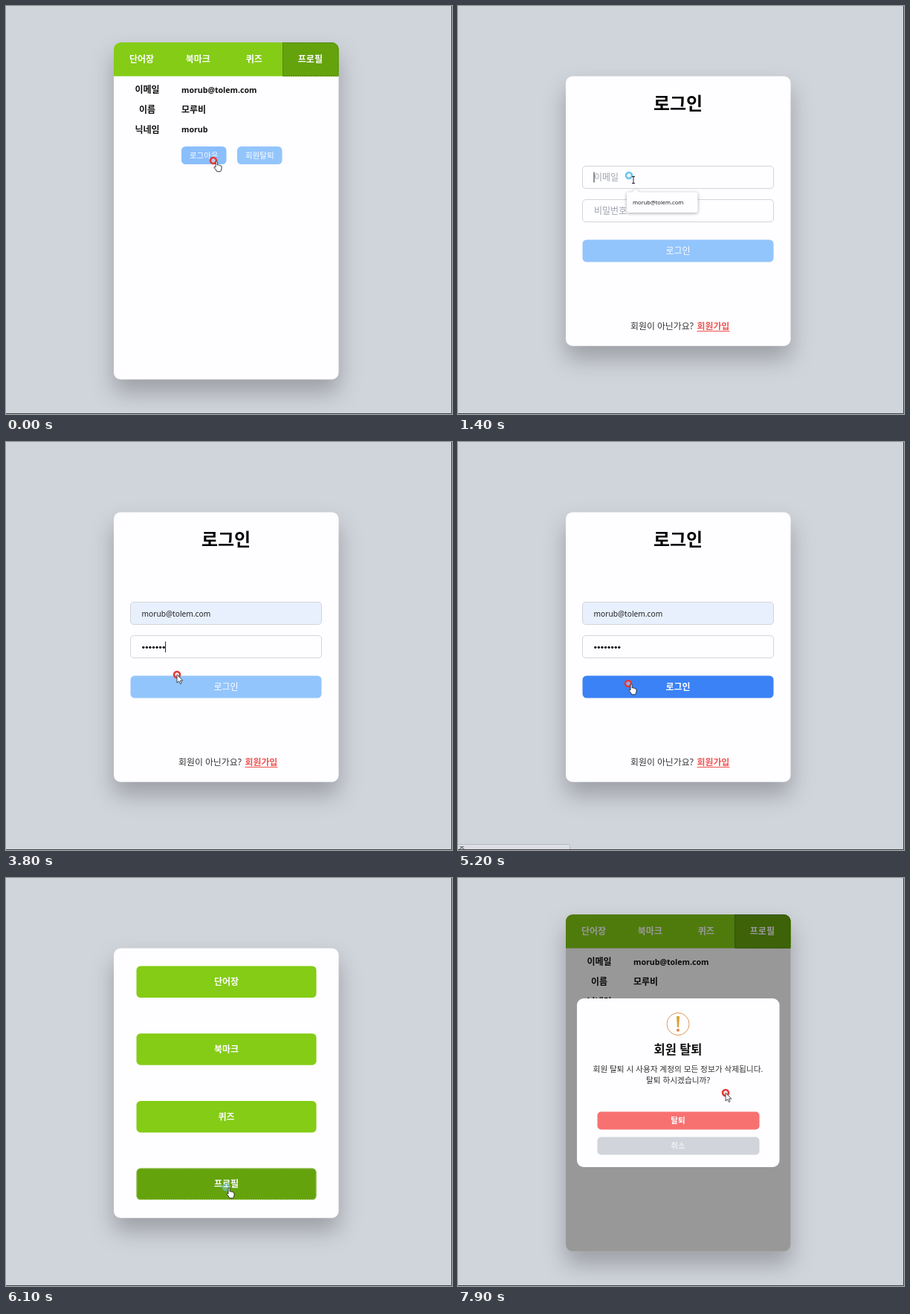
An HTML page that plays this animation: 600 px wide and 549 px high, repeating every 8 s.

```html
<!DOCTYPE html>
<html lang="ko">
<head>
<meta charset="utf-8">
<style>
html, body { margin: 0; width: 100%; height: 100%; overflow: hidden; background: #d0d4db; }
svg { display: block; width: 600px; height: 549px; }
text { font-family: "Noto Sans", "Noto Sans CJK KR", sans-serif; }
.card { fill: #fefdff; filter: drop-shadow(0 17px 15px rgba(0, 0, 0, .25)); }
</style>
</head>
<body>
<svg id="stage" viewBox="0 0 600 549"></svg>
<script>
const LOOP = 8000;
const EMAIL = 'morub@tolem.com';
const WHITE = '#fefdff', GREEN = '#84cc16', DARK_GREEN = '#65a30d';
const SKY = '#93c5fd', BLUE = '#3b82f6', GRAY = '#d1d5db';

// Cursor stops: time, x, y
const path = [
  [0, 279, 208], [500, 279, 208], [900, 256, 352], [1000, 248, 330], [1200, 230, 228],
  [1700, 230, 228], [2000, 240, 262], [2300, 240, 262], [2600, 232, 274], [2750, 232, 274],
  [3100, 230, 308], [3600, 230, 313], [4000, 230, 313], [4300, 229, 325], [5200, 229, 325],
  [5500, 232, 333], [5900, 296, 416], [6200, 296, 416], [6550, 442, 240], [6800, 390, 161],
  [6850, 390, 161], [7200, 348, 200], [7500, 348, 200], [7800, 360, 289], [8000, 360, 289]
];
const clicks = [[250, 400], [1350, 1550], [2050, 2200], [2650, 2750], [5050, 5180], [6050, 6200], [7350, 7480]];
const keys = [3000, 3100, 3200, 3400, 3600, 3750, 3800, 4000];

const buttons = [];
const rect = (x, y, w, h, r, fill, more = '') =>
  `<rect x="${x}" y="${y}" width="${w}" height="${h}" rx="${r}" fill="${fill}" ${more}/>`;
const text = (x, y, str, size, fill = '#111', weight = 400, anchor = 'middle') =>
  `<text x="${x}" y="${y}" dy=".37em" font-size="${size}" font-weight="${weight}" fill="${fill}" text-anchor="${anchor}">${str}</text>`;
const left = (x, y, str, size, fill, weight) => text(x, y, str, size, fill, weight, 'start');
const group = (id, body) => `<g id="${id}">${body}</g>`;
const card = (y, h) => rect(145, y, 302.5, h, 9, WHITE, 'class="card"');

function button(page, x, y, w, h, label, size, from, to, weight = 400) {
  const id = 'b' + buttons.length;
  buttons.push({ id, page, x, y, w, h, from, to, weight });
  return group(id, rect(x, y, w, h, 5.5, from) + text(x + w / 2, y + h / 2, label, size, WHITE, weight));
}

const tabs = ['단어장', '북마크', '퀴즈', '프로필'];
const navShape = 'M145 94.5V58a9 9 0 0 1 9-9H438.500a9 9 0 0 1 9 9V94.500Z';
const field = (id, y) => rect(167.5, y, 257, 30, 4.5, WHITE, `id="${id}" stroke="${GRAY}"`);

const profile = card(49, 453.5) +
  `<path d="${navShape}" fill="${GREEN}"/>` +
  `<path d="M372 49H438.500a9 9 0 0 1 9 9V94.500H372Z" fill="${DARK_GREEN}"/>` +
  '<path d="M372.500 49.500H438a9 9 0 0 1 9 9V94H372.500Z" fill="none" stroke="#4d7c0f" stroke-dasharray="2 1"/>' +
  tabs.map((s, i) => text(182.6 + 75.6 * i, 71.5, s, 12, WHITE, 700)).join('') +
  [['이메일', EMAIL, 10.6], ['이름', '모루비', 12], ['닉네임', 'morub', 10.6]].map(([name, value, size], i) =>
    text(190, 113 + 26.6 * i, name, 12, '#111', 700) +
    left(236, 113.3 + 26.6 * i, value, size, '#111', size < 12 ? 600 : 700)).join('') +
  button('profile', 236, 189, 60.5, 24, '로그아웃', 10.5, SKY, BLUE) +
  button('profile', 311, 189, 60.5, 24, '회원탈퇴', 10.5, SKY, BLUE);

const login = card(94.5, 363) +
  text(296, 131, '로그인', 24, '#000', 700) +
  field('emailBox', 215.5) + field('passBox', 260.5) +
  group('emailHint', left(183, 230.5, '이메일', 12, '#9ca3af')) +
  group('emailText', left(182.5, 231.5, EMAIL, 10.2, '#222')) +
  group('passHint', left(183, 275.5, '비밀번호', 12, '#9ca3af')) +
  group('dots', keys.map((_, i) => `<circle cx="${184.8 + 4.57 * i}" cy="276.3" r="1.6"/>`).join('')) +
  '<path id="caret" stroke="#222"/>' +
  button('login', 167.5, 314.5, 257, 30, '로그인', 12, SKY, BLUE) +
  left(232, 430.5, '회원이 아닌가요?', 11.9, '#333') +
  left(321.5, 430.5, '회원가입', 11.9, '#ef5350', 700) +
  '<path d="M321.500 437.500H365.500" stroke="#ef5350"/>' +
  group('popup', `<path d="M230 250.500H234L239 246.500L244 250.500H319.500a3 3 0 0 1 3 3V275a3 3 0 0 1-3 3H230a3 3 0 0 1-3-3V253.500a3 3 0 0 1 3-3Z" fill="${WHITE}" style="filter:drop-shadow(0 1px 2px rgba(0,0,0,.35))"/>` +
    left(235, 264.5, EMAIL, 7.5, '#222'));

const menu = card(94.5, 363) + tabs.map((s, i) =>
  button('menu', 175.5, 118.5 + 90.7 * i, 242, 42.5, s, 12, GREEN, DARK_GREEN, 700)).join('') +
  rect(176, 391, 241, 41.5, 5, 'none', 'id="focus" stroke="#a3c76a" stroke-dasharray="2 1"');

const modal = rect(145, 49, 302.5, 453.5, 9, 'rgba(0,0,0,.4)') +
  rect(160, 162, 272.5, 227, 9, WHITE) +
  '<circle cx="296" cy="196.500" r="15" fill="none" stroke="#dd9a55"/>' +
  '<path d="M294 186H298L297 201H295Z" fill="#d9a02c"/><circle cx="296" cy="204.800" r="2" fill="#e8833a"/>' +
  text(296, 231, '회원 탈퇴', 16.5, '#111', 700) +
  text(296, 257.5, '회원 탈퇴 시 사용자 계정의 모든 정보가 삭제됩니다.', 10.7, '#333') +
  text(296, 272, '탈퇴 하시겠습니까?', 10.7, '#333') +
  rect(187.5, 314.5, 218, 24, 5, '#f87171') + text(296, 326.5, '탈퇴', 10.5, WHITE, 700) +
  rect(187.5, 348.5, 218, 24, 5, GRAY) + text(296, 360.5, '취소', 10.5, WHITE);

const pointer = '<circle id="ring" r="4" stroke-width="2.600"/>' +
  `<path id="arrow" d="M0 0V11L2.600 8.700L4.300 12.500L6 11.700L4.400 8.100H7.800Z" fill="${WHITE}" stroke="#222" stroke-width=".8"/>` +
  `<path id="hand" d="M3 1.500Q4.200 0 5.200 1.500V6Q6.500 5 7.300 6.400Q8.500 5.500 9.200 6.900Q10.600 6.300 11 8V11Q10.500 13 9.600 14.800H4.800Q3.500 12 1 9.500Q.8 7.800 3 8.900Z" fill="${WHITE}" stroke="#222" stroke-width=".9"/>` +
  '<path id="beam" d="M4 1.500H8M6 1.500V10.500M4 10.500H8" fill="none" stroke="#222"/>';

const stage = document.getElementById('stage');
stage.innerHTML = rect(0, 0, 600, 549, 0, '#d0d4db') +
  group('profile', profile) + group('login', login) + group('menu', menu) + group('modal', modal) +
  group('status', rect(-1, 541.5, 151.5, 10, 1, '#dcdfe4', 'stroke="#b4b8be"') + left(1, 549, '중', 9, '#333')) +
  '<path d="M599.500 0V548.500H0" fill="none" stroke="#3c3e42"/>' + group('pointer', pointer);

const $ = id => document.getElementById(id);
const show = (id, on) => { $(id).style.display = on ? '' : 'none'; };
const inside = ([x, y], b) => x >= b.x && x <= b.x + b.w && y >= b.y && y <= b.y + b.h;

function pageAt(t) {
  if (t >= 7500) return 'modal';
  return t < 700 || t >= 6300 ? 'profile' : t < 5500 ? 'login' : 'menu';
}

function cursorAt(t) {
  const i = path.findIndex(p => p[0] > t);
  const [t0, x0, y0] = path[i - 1], [t1, x1, y1] = path[i];
  const k = (t - t0) / (t1 - t0), e = k * k * (3 - 2 * k);
  return [x0 + (x1 - x0) * e, y0 + (y1 - y0) * e];
}

const hovers = (b, t) => pageAt(t) === b.page && inside(cursorAt(t), b);

// Share of the last 150 ms spent over a button gives its colour fade
function hoverMix(b, t) {
  let sum = 0;
  for (let i = 0; i < 10; i++) sum += hovers(b, (t - i * 15 + LOOP) % LOOP);
  return sum / 10;
}

function draw(t) {
  const page = pageAt(t), pos = cursorAt(t);
  show('profile', page === 'profile' || page === 'modal');
  for (const id of ['login', 'menu', 'modal']) show(id, page === id);

  for (const b of buttons) {
    const mix = hoverMix(b, t), [box, label] = $(b.id).children;
    box.style.fill = `color-mix(in srgb, ${b.to} ${mix * 100}%, ${b.from})`;
    label.style.fontWeight = mix > .4 ? 700 : b.weight;
  }

  const filled = t >= 2150, inPass = t >= 2700, typed = keys.filter(k => t >= k).length;
  show('emailHint', !filled);
  show('emailText', filled);
  $('emailBox').style.fill = filled ? '#e8f0fe' : WHITE;
  show('popup', t >= 1380 && !filled);
  show('passHint', !typed);
  [...$('dots').children].forEach((dot, i) => { dot.style.display = i < typed ? '' : 'none'; });
  show('caret', t >= 1380 && t < 5100 && (!filled || inPass));
  $('caret').setAttribute('d', inPass ? `M${182.6 + 4.57 * typed} 268.500v14.500` : 'M183 223.500v14');
  show('status', t >= 5150 && t < 5500);
  show('focus', t >= 6050);

  const overField = page === 'login' && !(t >= 1700 && t < 2300) &&
    [215, 260].some(y => inside(pos, { x: 167, y, w: 258, h: 31 }));
  const overButton = buttons.some(b => hovers(b, t));
  show('hand', overButton);
  show('beam', overField);
  show('arrow', !overButton && !overField);
  const down = clicks.some(([a, b]) => t >= a && t < b);
  $('ring').style.stroke = down ? '#6cc5ee' : '#e23a3a';
  $('ring').style.fill = down ? 'rgba(225,245,255,.5)' : 'rgba(255,210,210,.45)';
  $('ring').style.opacity = down && page === 'menu' ? .6 : 1;
  $('pointer').setAttribute('transform', `translate(${pos})`);
}

const start = performance.now();
function tick() {
  draw((performance.now() - start) % LOOP);
  requestAnimationFrame(tick);
}
tick();
</script>
</body>
</html>
```
